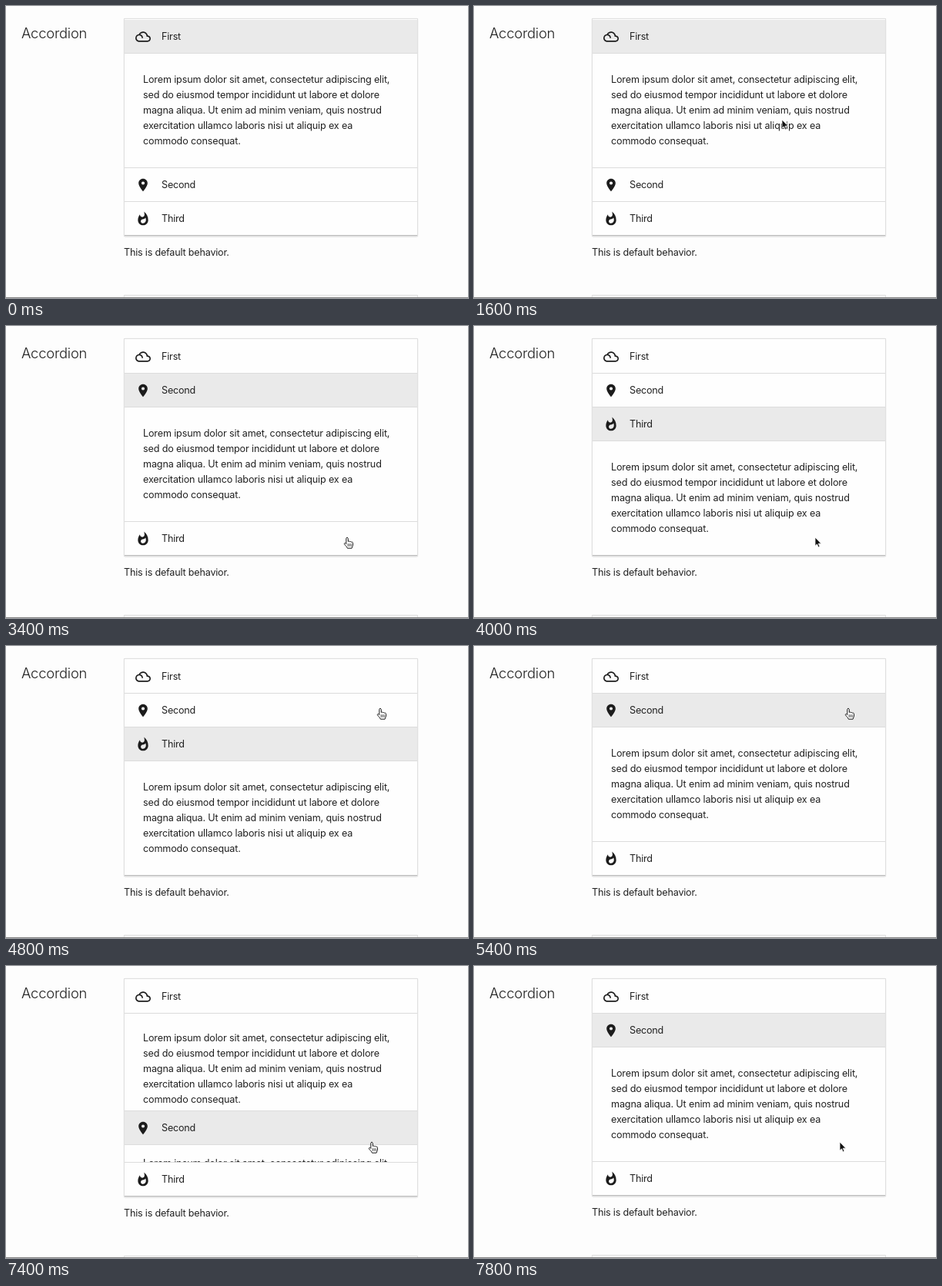
An HTML page that plays this animation: 600 px wide and 380 px high, repeating every 8000 ms.

```html
<!DOCTYPE html>
<html lang="en">
<head>
<meta charset="utf-8">
<title>Accordion</title>
<style>
  * { box-sizing: border-box; }
  html, body { margin: 0; width: 100%; height: 100%; overflow: hidden; }
  body {
    position: relative; background: #fdfdfd; color: #212121;
    font: 12.6px/20px Inter, "Open Sans", sans-serif; letter-spacing: -.2px;
  }
  h1 {
    position: absolute; left: 20px; top: 23px; margin: 0;
    font-size: 18.4px; line-height: 24px; font-weight: 350; letter-spacing: -.22px;
  }
  main { position: absolute; left: 154px; top: 17px; width: 380px; }
  .card {
    position: relative; padding-top: 1px; background: #fefefe;
    box-shadow: 0 0 0 1px #e0e0e0, 0 0 2px rgba(0,0,0,.25), 0 1px 2px rgba(0,0,0,.2);
  }
  .card::after {
    content: ""; position: absolute; left: 0; right: 0; bottom: 0;
    height: 1px; background: #bcbcbc;
  }
  .head {
    height: 44px; border-bottom: 1px solid #dcdcdc;
    display: flex; align-items: center; padding: .8px 0 0 14px;
  }
  .head.focus { background: #eaeaea; }
  .head svg { width: 20px; height: 20px; margin-right: 14px; fill: #1c1c1c; }
  .body { overflow: hidden; padding: 0 24px; border-bottom: 1px solid #dcdcdc; white-space: nowrap; }
  .body p { margin: 12px 0; letter-spacing: -.15px; }
  .note { margin: 12px 0 0 -1px; height: 20px; }
  .next { margin-top: 46px; height: 60px; }
  .edge { position: absolute; left: 0; right: 0; top: 379px; height: 1px; background: #858585; }
  .cursor { position: absolute; left: 0; top: 0; overflow: visible; }
</style>
</head>
<body>
<h1>Accordion</h1>
<main>
  <div class="card" id="list"></div>
  <div class="note">This is default behavior.</div>
  <div class="card next"></div>
</main>
<div class="edge"></div>
<svg class="cursor" id="cursor" width="16" height="18">
  <g id="hand" stroke="#1a1a1a" stroke-linejoin="round" stroke-linecap="round">
    <path fill="#fff" d="M0 .4c.9 0 1.3.6 1.3 1.4v3.6c.3-.5 2-.5 2.2.4.4-.5 1.9-.4 2.1.5.5-.4 1.9-.2 1.9 1.1v2.6c0 1.8-1.3 2.4-1.4 4.2H.4c-.4-1.7-2.6-3.4-3.9-5.3-.6-1 .6-1.9 1.6-1.1l.7.7V1.8C-1.2 1-.8.4 0 .4z"/>
    <path fill="none" stroke-width=".8" d="M1.2 8.6v2.8M3.2 8.6v2.8M5.2 8.6v2.8"/>
  </g>
  <path id="arrow" fill="#111" stroke="#fff" stroke-width=".8" d="M0 0v11.2l2.5-2.3 1.7 4 1.8-.8-1.7-3.9h3.6z"/>
</svg>
<script>
const LOOP = 8000, STEP = 200, SLIDE = 300;
const TOP = 18, HEAD = 44, BODY = 148, PAD = 12;

const text = [
  "Lorem ipsum dolor sit amet, consectetur adipiscing elit,",
  "sed do eiusmod tempor incididunt ut labore et dolore",
  "magna aliqua. Ut enim ad minim veniam, quis nostrud",
  "exercitation ullamco laboris nisi ut aliquip ex ea",
  "commodo consequat."
].join("<br>");

const cloud = "M19.35 10.04C18.67 6.59 15.64 4 12 4 9.11 4 6.61 5.64 5.36 8.04 2.35 8.36 0 10.9 0 14c0 3.31 2.69 6 6 6h13c2.76 0 5-2.24 5-5 0-2.64-2.05-4.78-4.65-4.96zM19 18H6c-2.21 0-4-1.79-4-4s1.79-4 4-4 4 1.79 4 4h2c0-2.76-1.86-5.08-4.4-5.78C8.61 6.88 10.2 6 12 6c3.03 0 5.5 2.47 5.5 5.5v.5H19c1.65 0 3 1.35 3 3s-1.35 3-3 3z";
const pin = "M12 2C8.13 2 5 5.13 5 9c0 5.25 7 13 7 13s7-7.75 7-13c0-3.87-3.13-7-7-7zm0 9.5a2.5 2.5 0 1 1 0-5 2.5 2.5 0 0 1 0 5z";
const flame = "M13.5.67s.74 2.65.74 4.8c0 2.06-1.35 3.73-3.41 3.73-2.07 0-3.63-1.67-3.63-3.73l.03-.36C5.21 7.51 4 10.62 4 14c0 4.42 3.58 8 8 8s8-3.58 8-8C20 8.61 17.41 3.8 13.5.67zM11.71 19c-1.78 0-3.22-1.4-3.22-3.14 0-1.62 1.05-2.76 2.81-3.12 1.77-.36 3.6-1.21 4.62-2.58.39 1.29.59 2.65.59 4.04 0 2.65-2.15 4.8-4.8 4.8z";

// [time, item opened]
const clicks = [[-SLIDE, 0], [2535, 1], [3700, 2], [4900, 1], [6135, 0], [7300, 1]];

// [time, x, y] of the pointer tip
const path = [
  [600, 546, 366], [1600, 400, 148], [1800, 400, 148], [2200, 420, 240],
  [2700, 420, 240], [3400, 443, 275], [4000, 443, 275], [4800, 486, 81],
  [5400, 486, 81], [6000, 484, 44], [6600, 484, 44], [7200, 475, 229], [LOOP, 475, 229]
];

const $ = id => document.getElementById(id);
const inOutCubic = p => p < .5 ? 4 * p ** 3 : 1 - 4 * (1 - p) ** 3;
const inOutSine = p => (1 - Math.cos(Math.PI * p)) / 2;

$("list").innerHTML = [["First", cloud], ["Second", pin], ["Third", flame]].map(([name, d]) =>
  `<div class="item"><div class="head"><svg viewBox="0 0 24 24"><path d="${d}"/></svg>${name}</div>` +
  `<div class="body"><p>${text}</p></div></div>`).join("");
const heads = [...document.querySelectorAll(".head")];
const bodies = [...document.querySelectorAll(".body")];

function setBody(el, share, height) {
  el.style.display = share > 0 ? "block" : "none";
  el.style.height = share * height + 1 + "px";
  el.style.paddingTop = share * PAD + "px";
}

// Lays out the items and returns the top of each header.
function drawList(t) {
  const i = clicks.findLastIndex(c => c[0] <= t);
  const [start, open] = clicks[i];
  const last = i ? clicks[i - 1][1] : -1;
  const p = inOutCubic(Math.min(1, (t - start) / SLIDE));
  let y = TOP;
  return bodies.map((body, n) => {
    const share = n === open ? p : n === last ? 1 - p : 0;
    // an opening body grows a little short, then snaps to its full height
    const height = n === open && p < 1 ? BODY - 2 : BODY;
    setBody(body, share, height);
    heads[n].classList.toggle("focus", n === open);
    const top = y;
    y += HEAD + (share > 0 ? share * height + 1 : 0);
    return top;
  });
}

function drawCursor(t, tops) {
  const shown = t >= path[0][0];
  $("cursor").style.display = shown ? "block" : "none";
  if (!shown) return;
  const i = path.findIndex(k => k[0] > t);
  const [a, b] = [path[i - 1], path[i]];
  const p = inOutSine((t - a[0]) / (b[0] - a[0]));
  const x = a[1] + (b[1] - a[1]) * p;
  const y = a[2] + (b[2] - a[2]) * p;
  const onHead = x > 154 && x < 534 && tops.some(top => y >= top && y < top + HEAD);
  $("hand").style.display = onHead ? "inline" : "none";
  $("arrow").style.display = onHead ? "none" : "inline";
  $("cursor").style.transform = `translate(${x}px, ${y}px)`;
}

function draw(t) {
  drawCursor(t, drawList(t));
}

const begin = performance.now();
function tick(now) {
  const t = Math.max(0, now - begin) % LOOP;
  draw(Math.floor(t / STEP) * STEP);
  requestAnimationFrame(tick);
}
draw(0);
requestAnimationFrame(tick);
</script>
</body>
</html>
```
